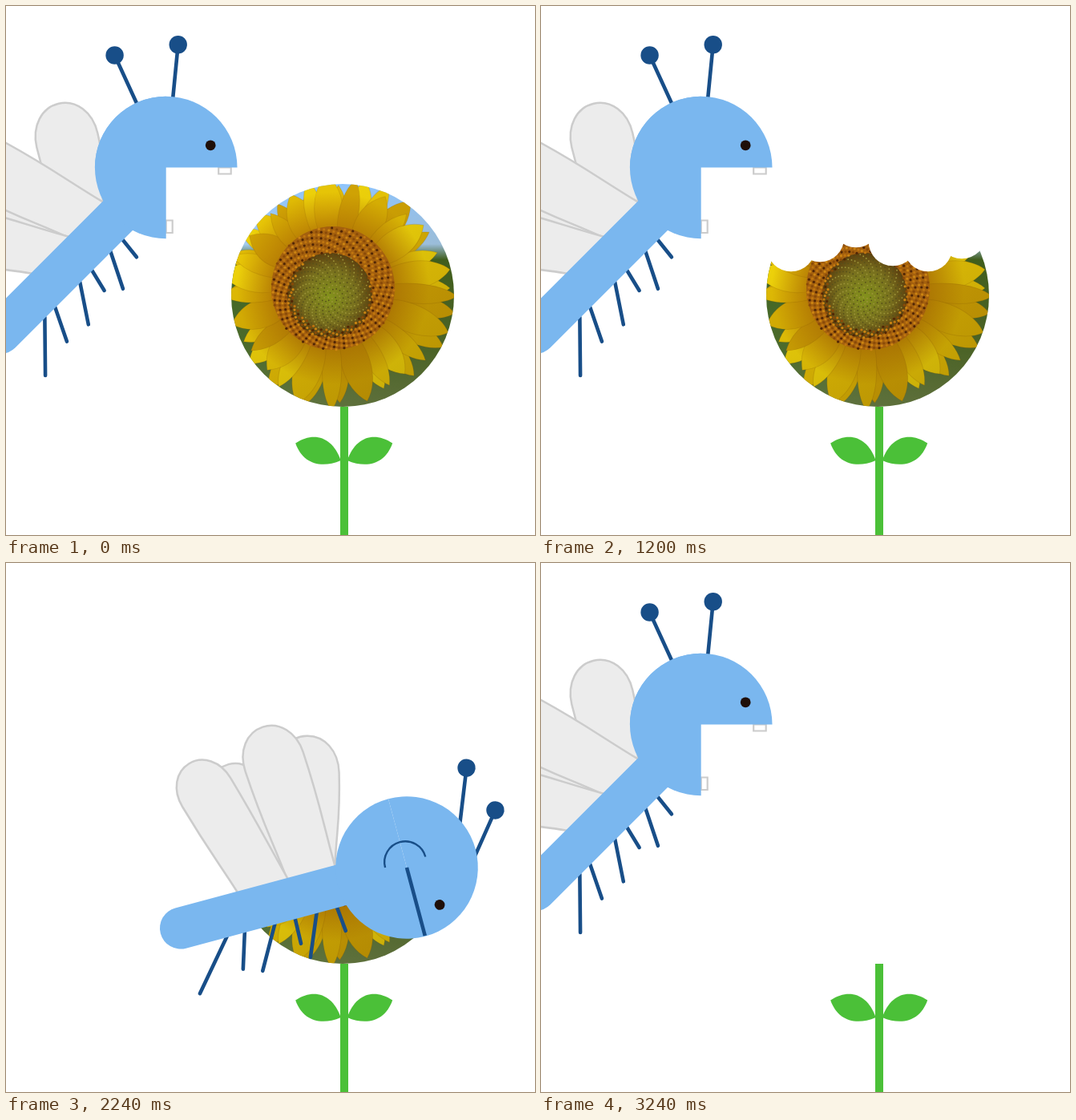
These frames come from a looping animation (660 by 660 pixels, 3760 ms). An HTML page with a canvas:

```html
<!DOCTYPE html>
<html lang="en">
<head>
<meta charset="utf-8">
<title>Hungry bug</title>
<style>
  html, body { margin: 0; width: 100%; height: 100%; overflow: hidden; background: #fff; }
  canvas { display: block; }
</style>
</head>
<body>
<canvas id="stage" width="660" height="660"></canvas>
<script>
const ctx = document.getElementById('stage').getContext('2d');
const TAU = Math.PI * 2, DEG = Math.PI / 180;
const LOOP = 3760, STEP = 40, CYCLE = 680;
const BLUE = '#7ab7ef', NAVY = '#184e88', GREY = '#ccc', GREEN = '#4bc038';
const HOME = [199.7, 201.5], HEAD_R = 88.8;

// Head position at each bite, scallop centres, and outer corners of the removed area
const BITES = [
  { head: [322, 240], cuts: [[312, 301], [348, 289], [366, 268], [384, 237]],
    outer: [[384, 200], [260, 200], [260, 301]] },
  { head: [473, 243], cuts: [[393, 271], [439, 294], [483, 301], [525, 285]],
    outer: [[560, 285], [560, 200], [380, 200]] },
  { head: [358, 363], cuts: [[440, 328], [414, 378], [371, 404], [319, 422]],
    outer: [[270, 422], [270, 280], [440, 280]] },
  { head: [500, 380], cuts: [[439, 384], [468, 415], [505, 435]],
    outer: [[600, 435], [600, 250], [439, 250]] },
  { head: [433, 441], cuts: [], outer: [] }
];

// Back to front: base edge on the body, rounded end when open and when biting
const WINGS = [
  { base: [-212, -147], open: [-180, -146], shut: [-181, -148], r: 34 },
  { base: [-148, -86], open: [-59, -118], shut: [-87, -153], r: 39 },
  { base: [-148, -86], open: [-162, -172], shut: [-126, -178], r: 38 },
  { base: [-212, -147], open: [-256, -147], shut: [-219, -162], r: 35 }
];
const LEGS = [ // base x, tip x, tip y
  [-239, -290, 77], [-221, -241, 66], [-177, -207, 70],
  [-156, -163, 54], [-123, -145, 69], [-102, -105, 53]
];

const mix = (a, b, k) => a + (b - a) * k;
const mixPoint = (a, b, k) => [mix(a[0], b[0], k), mix(a[1], b[1], k)];
const polar = (r, a) => [r * Math.cos(a), r * Math.sin(a)];

function disc(x, y, r, fill, c = ctx) {
  c.fillStyle = fill;
  c.beginPath();
  c.arc(x, y, r, 0, TAU);
  c.fill();
}

function line(a, b, color, width, cap = 'round') {
  ctx.strokeStyle = color;
  ctx.lineWidth = width;
  ctx.lineCap = cap;
  ctx.beginPath();
  ctx.moveTo(...a);
  ctx.lineTo(...b);
  ctx.stroke();
}

function rotated(angle, draw) {
  ctx.save();
  ctx.rotate(angle);
  draw();
  ctx.restore();
}

function withStops(gradient, stops) {
  stops.forEach(([at, color]) => gradient.addColorStop(at, color));
  return gradient;
}

function makeBloom() {
  const canvas = document.createElement('canvas');
  canvas.width = canvas.height = 660;
  const c = canvas.getContext('2d');
  c.beginPath();
  c.arc(420, 361, 139, 0, TAU);
  c.clip();

  c.fillStyle = withStops(c.createLinearGradient(0, 222, 0, 500),
    [[0, '#8fc4fb'], [.27, '#a4ccf0'], [.34, '#3f6420'], [.75, '#4d7030'], [1, '#64804a']]);
  c.fillRect(280, 220, 280, 280);

  c.translate(408, 352);
  const colors = ['#e6c407', '#d8b004', '#ecd00a', '#cfa204', '#dfba05'];
  for (let i = 0; i < 50; i++) {
    const front = i >= 24;
    const angle = (i + (front ? .5 : 0)) * TAU / (front ? 26 : 24);
    const reach = 139 + 9 * Math.cos(angle - .7) + 9 * Math.sin(i * 7.3);
    const half = 20 + 4 * Math.sin(i * 3.1);
    c.save();
    c.rotate(angle + .06 * Math.sin(i * 5));
    c.beginPath();
    c.moveTo(50, 0);
    c.bezierCurveTo(75, -half, reach - 22, -half, reach, 0);
    c.bezierCurveTo(reach - 22, half, 75, half, 50, 0);
    c.fillStyle = withStops(c.createLinearGradient(70, 0, 120, 0),
      [[0, '#b87d04'], [1, colors[i * 3 % 5]]]);
    c.fill();
    c.strokeStyle = 'rgba(140,95,0,.22)';
    c.stroke();
    c.restore();
  }
  c.fillStyle = withStops(c.createLinearGradient(-60, -60, 70, 130),
    [[0, 'rgba(70,45,0,0)'], [1, 'rgba(70,45,0,.2)']]);
  c.fillRect(-140, -140, 300, 300);

  disc(0, 0, 77, '#a4600e', c);
  disc(-4, 9, 53, withStops(c.createRadialGradient(-4, 11, 2, -4, 9, 53),
    [[0, '#83901c'], [.6, '#78701e'], [1, '#5c400f']]), c);
  const seeds = ['#cd8512', '#512605', '#c0750f', '#8a4a08'];
  for (let i = 1; i < 900; i++) {
    const r = 2.55 * Math.sqrt(i), [x, y] = polar(r, i * 2.39996);
    const shift = 1 - r / 80;
    const color = r < 48 ? (i % 2 ? '#9c9438' : '#57501a') : seeds[i * 7 % 4];
    disc(x - 4 * shift, y + 10 * shift, r < 48 ? .9 : 1.6, color, c);
  }
  return canvas;
}
const bloom = makeBloom();

function drawFlower(eaten) {
  if (eaten < BITES.length) {
    ctx.drawImage(bloom, 0, 0);
    for (const { cuts, outer } of BITES.slice(0, eaten)) {
      ctx.fillStyle = '#fff';
      ctx.beginPath();
      [...cuts, ...outer].forEach(p => ctx.lineTo(...p));
      ctx.fill();
      cuts.forEach(p => disc(...p, 30.3, '#fff'));
    }
  }
  ctx.fillStyle = GREEN;
  ctx.fillRect(417, 500, 10, 160);
  for (const side of [-1, 1]) {
    ctx.save();
    ctx.translate(421.7, 0);
    ctx.scale(side, 1);
    ctx.beginPath();
    ctx.moveTo(60.5, 545.5);
    ctx.bezierCurveTo(37, 530, 14, 538, 4, 567);
    ctx.bezierCurveTo(30, 578, 52, 570, 60.5, 545.5);
    ctx.fill();
    ctx.restore();
  }
}

function drawWing({ base: [left, right], open, shut, r }, k) {
  const [x, y] = mixPoint(open, shut, k), rootY = -25;
  const dx = x - (left + right) / 2, dy = y - rootY, d = Math.hypot(dx, dy);
  const [ax, ay] = [dx / d, dy / d];
  // Point given along and across the wing's axis, from the centre of its round end
  const at = (along, across) => [x + ax * along - ay * across, y + ay * along + ax * across];
  const wide = -.2 * r;
  ctx.beginPath();
  ctx.moveTo(left + 6, rootY + 10);
  ctx.lineTo(left, rootY);
  ctx.bezierCurveTo(...mixPoint([left, rootY], at(0, -r), .35), ...at(-.5 * d, -r), ...at(wide, -r));
  ctx.bezierCurveTo(...at(.5 * r, -r), ...at(r, -.56 * r), ...at(r, 0));
  ctx.bezierCurveTo(...at(r, .56 * r), ...at(.5 * r, r), ...at(wide, r));
  ctx.bezierCurveTo(...at(-.5 * d, r), ...mixPoint([right, rootY], at(0, r), .35), right, rootY);
  ctx.lineTo(right + 2, rootY + 10);
  ctx.fillStyle = '#ececec';
  ctx.fill();
  ctx.strokeStyle = GREY;
  ctx.lineWidth = 2.5;
  ctx.stroke();
}

function drawTooth(x, y) {
  ctx.fillStyle = '#fff';
  ctx.strokeStyle = GREY;
  ctx.lineWidth = 2.2;
  ctx.beginPath();
  ctx.rect(x, y, 8, 15.5);
  ctx.fill();
  ctx.stroke();
}

function drawAntenna(rootAngle, fromDir, toDir, fromLength, toLength, k) {
  const root = polar(86, rootAngle * DEG);
  const [dx, dy] = polar(mix(fromLength, toLength, k), mix(fromDir, toDir, k) * DEG);
  const tip = [root[0] + dx, root[1] + dy];
  line(root, tip, NAVY, 4.6);
  disc(...tip, 11.2, NAVY);
}

function halfHead(from) {
  ctx.fillStyle = BLUE;
  ctx.beginPath();
  ctx.arc(0, 0, HEAD_R, from, from + Math.PI);
  ctx.fill();
}

function drawBug([x, y], k) {
  const gape = (1 - k) * 45 * DEG;
  ctx.save();
  ctx.translate(x, y);
  ctx.rotate(mix(-45, -15, k) * DEG);

  WINGS.forEach(wing => drawWing(wing, k));
  LEGS.forEach(([baseX, tipX, tipY], i) => {
    const far = i % 2;
    line([baseX + far * 5 * k, 25], [tipX + far * 11 * k, tipY + (far ? 3.5 : 8) * k], NAVY, 4.6);
  });
  rotated(-gape, () => {
    drawAntenna(-24.6, -24.6, -68.2, 68, 70, k);
    drawAntenna(5.6, 5.6, -51, 68, 63, k);
    drawTooth(-8, 65.5);
  });
  rotated(gape, () => drawTooth(0, 66));

  line([-55, 0], [-292, 0], BLUE, 52);
  rotated(gape, () => halfHead(Math.PI / 2));
  rotated(-gape, () => {
    halfHead(-Math.PI / 2);
    disc(27.7, 55.5, 6.4, '#1f0f08');
  });

  if (k === 1) {
    line([0, 0], [0, 88], NAVY, 4.6, 'butt');
    ctx.lineWidth = 2.4;
    ctx.beginPath();
    ctx.arc(0, -7, 26, Math.PI, TAU);
    ctx.stroke();
  }
  ctx.restore();
}

const clamp = v => Math.min(1, Math.max(0, v));
const glide = u => Math.sin(u * Math.PI / 2);
const swing = u => (1 - Math.cos(u * Math.PI)) / 2;

function render(time) {
  const t = Math.floor(time % LOOP / STEP) * STEP;
  const index = Math.min(Math.floor(t / CYCLE), BITES.length - 1);
  const local = t - index * CYCLE;
  const out = clamp(local / 200), back = clamp((local - 320) / 200);
  const travel = back ? 1 - glide(back) : glide(out);
  const turn = back ? 1 - swing(back) : swing(out);

  ctx.fillStyle = '#fff';
  ctx.fillRect(0, 0, 660, 660);
  drawFlower(index + (out === 1 ? 1 : 0));
  drawBug(mixPoint(HOME, BITES[index].head, travel), turn);
}

const start = performance.now();
function tick() {
  render(performance.now() - start);
  requestAnimationFrame(tick);
}
tick();
</script>
</body>
</html>
```
